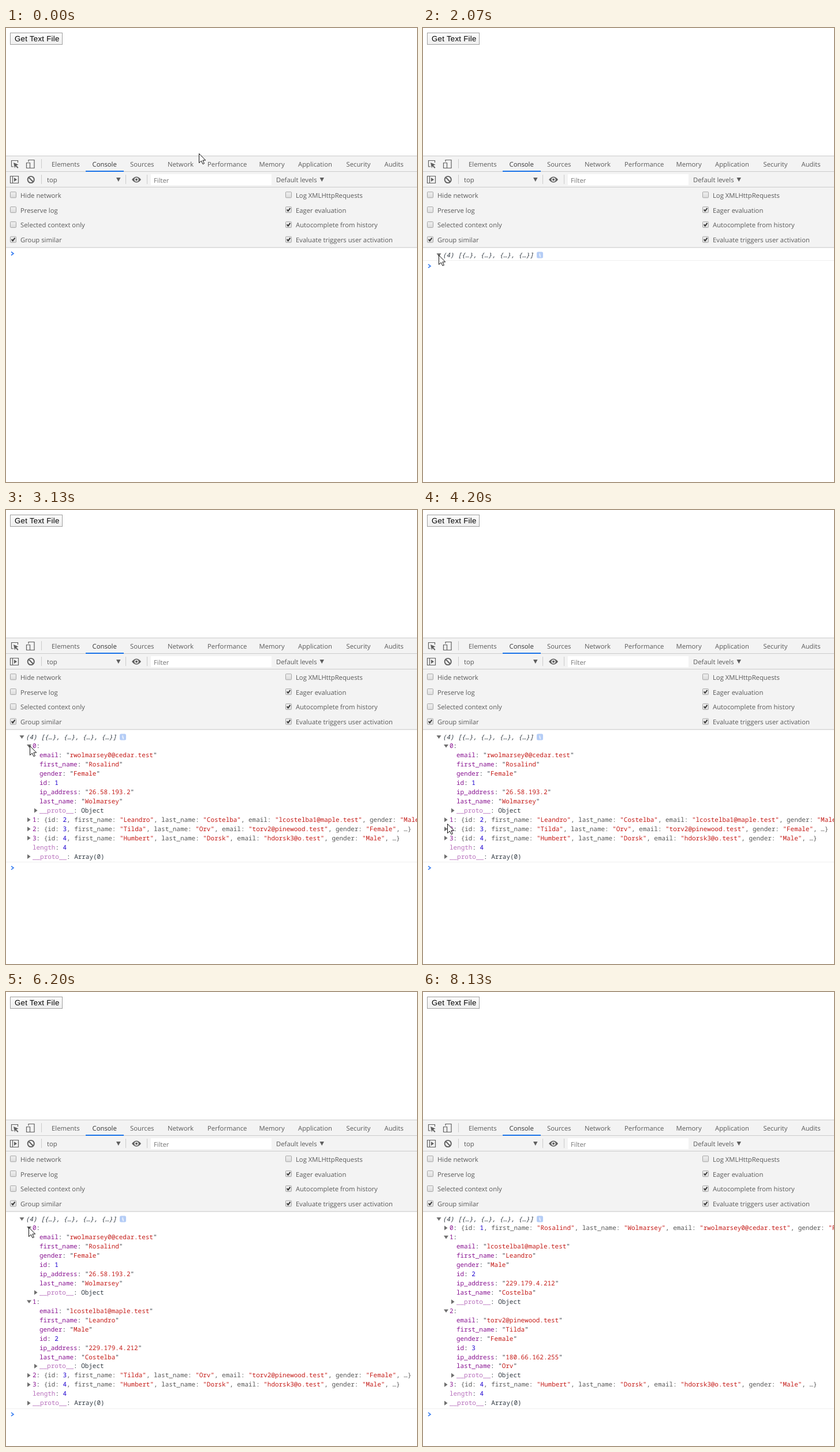
Animation, 712 px wide and 786 px high, one loop 8870 ms. Source, as an HTML page:

```html
<!DOCTYPE html>
<html lang="en">
<head>
<meta charset="utf-8">
<title>Console</title>
<style>
html, body { margin: 0; width: 100%; height: 100%; overflow: hidden; background: #fff; }
svg { display: block; width: 100%; height: 100%; }
text { white-space: pre; text-rendering: geometricPrecision; }
.ui { font: 11.3px "Open Sans", "Noto Sans", sans-serif; fill: #5a5a5a; }
.mono { font: 10.95px "Noto Sans Mono", "DejaVu Sans Mono", monospace; fill: #303942; }
.key { fill: #881391; }
.dim { fill: #b871bd; }
.str { fill: #c41a16; }
.num { fill: #1c00cf; }
.pre { fill: #565656; }
</style>
</head>
<body>
<svg viewBox="0 0 712 786">
  <defs>
    <linearGradient id="face" x2="0" y2="1"><stop stop-color="#fbfbfb"/><stop offset="1" stop-color="#efefef"/></linearGradient>
    <linearGradient id="box" x2="0" y2="1"><stop stop-color="#f0f0f0"/><stop offset="1" stop-color="#dcdcdc"/></linearGradient>
  </defs>
  <rect id="button" x="7.5" y="8.5" width="90" height="20" fill="url(#face)"/>
  <text x="15" y="23" font-family="Liberation Sans, Arial, sans-serif" font-size="13.2" letter-spacing=".3">Get Text File</text>
  <g id="panel"></g>
  <g id="output"></g>
  <path id="cursor" d="M.5.5V16.5L4.3 13L7 18.6L9.4 17.6L6.9 12H11.7Z" fill="#fff" stroke="#111" stroke-linejoin="round"/>
</svg>
<script>
const LOOP = 8870;
const ROW = 15.95;
const $ = id => document.getElementById(id);

const rect = (x, y, w, h, fill, extra = '') =>
  `<rect x="${x}" y="${y}" width="${w}" height="${h}" fill="${fill}" ${extra}/>`;
const label = (x, y, str, style = '') => `<text class="ui" x="${x}" y="${y}" style="${style}">${str}</text>`;
const path = (d, fill, extra = '') => `<path d="${d}" fill="${fill}" ${extra}/>`;
const line = (d, extra = '') => path(d, 'none', `stroke="#5f5f5f" stroke-width="1.2" ${extra}`);
const mono = (x, y, str, style = '') => `<text class="mono" x="${x}" y="${y}" style="${style}">${str}</text>`;
const span = (cls, str) => `<tspan class="${cls}">${str}</tspan>`;

function checkbox(x, y, str, checked) {
  return rect(x + .5, y - 5.5, 10, 10, 'url(#box)', 'rx="1" stroke="#a5a5a5"') +
    (checked ? path(`M${x + 2.7} ${y - .8}l2 2.5l3.8-5`, 'none', 'stroke="#333" stroke-width="1.9"') : '') +
    label(x + 18, y + 4.4, str);
}

function drawPanel() {
  const tabs = [[79, 'Elements'], [149.5, 'Console'], [215, 'Sources'], [280, 'Network'], [349, 'Performance'],
    [438.5, 'Memory'], [506, 'Application'], [589.5, 'Security'], [655.5, 'Audits']];
  const left = ['Hide network', 'Preserve log', 'Selected context only', 'Group similar'];
  const right = ['Log XMLHttpRequests', 'Eager evaluation', 'Autocomplete from history', 'Evaluate triggers user activation'];
  const icons =
    line('M13 240H9.5V229.5H20.5V233') + path('M13 233l8.5 3.5l-3.6 1.4l3.6 3.6l-1.4 1.4l-3.6-3.6l-1.4 3.4z', '#5f5f5f') +
    line('M39 231.5V228.5H49V242.5H42') + line('M35.5 233.5H41.5V242.5H35.5Z') +
    line('M7.5 256.5H21.5V268.5H7.5ZM11.5 256.5V268.5') + path('M14 259l5 3.5l-5 3.5z', '#5f5f5f') +
    line('M48.8 262.5a5.6 5.6 0 1 1-11.2 0a5.6 5.6 0 1 1 11.2 0M39.3 258.5L47.1 266.5', 'style="stroke-width:1.9"') +
    path('M218 262.5Q226 252.5 234 262.5Q226 272.5 218 262.5Z', '#5f5f5f') +
    '<circle cx="226" cy="262.5" r="3.6" fill="#f3f3f3"/><circle cx="226" cy="262.5" r="2" fill="#5f5f5f"/>';
  $('panel').innerHTML =
    rect(0, 221, 712, 160, '#f3f3f3') +
    [221, 248, 275, 379.5].map(y => rect(0, y, 712, 1, '#cbcbcb')).join('') +
    rect(138, 247, 66, 2, '#1a73e8') +
    [[61, 227], [61, 254], [207, 254], [244, 254]].map(([x, y]) => rect(x, y, 1, 16, '#cbcbcb')).join('') +
    tabs.map(([x, str]) => label(x, 240.3, str, str === 'Console' ? 'fill:#333' : '')).join('') +
    icons +
    label(71, 267, 'top') + path('M191 259h7.5l-3.75 7z', '#5f5f5f') +
    rect(251, 253, 209, 19, '#fff') + label(256, 267.6, 'Filter', 'fill:#757575') +
    label(468, 267, 'Default levels') + path('M543.5 259h7.5l-3.75 7z', '#5f5f5f') +
    left.map((str, i) => checkbox(7, 289.3 + i * 25.8, str, i === 3)).join('') +
    right.map((str, i) => checkbox(484, 289.3 + i * 25.8, str, i > 0)).join('');
}

const people = [
  { email: 'rwolmarsey0@cedar.test', first_name: 'Rosalind', gender: 'Female', id: 1, ip_address: '26.58.193.2', last_name: 'Wolmarsey' },
  { email: 'lcostelba1@maple.test', first_name: 'Leandro', gender: 'Male', id: 2, ip_address: '229.179.4.212', last_name: 'Costelba' },
  { email: 'torv2@pinewood.test', first_name: 'Tilda', gender: 'Female', id: 3, ip_address: '180.66.162.255', last_name: 'Orv' },
  { email: 'hdorsk3@o.test', first_name: 'Humbert', gender: 'Male', id: 4, ip_address: '', last_name: 'Dorsk' },
];
const previewKeys = ['id', 'first_name', 'last_name', 'email', 'gender'];

const value = v => typeof v === 'number' ? span('num', v) : `"${span('str', v)}"`;
const quoted = v => typeof v === 'number' ? span('num', v) : span('str', `"${v}"`);
const preview = p => span('pre', '{' + previewKeys.map(k => `${k}: ${quoted(p[k])}`).join(', ') + ', …}');

function arrow(x, y, open) {
  const d = open ? `M${x - 1} ${y - 2.7}h8l-4 5.6z` : `M${x} ${y - 4}l5.5 4l-5.5 4z`;
  return path(d, '#6e6e6e');
}

function listRows(open) {
  const rows = [];
  people.forEach((p, i) => {
    rows.push({ x: 46, str: span('key', i) + ': ' + (open[i] ? '' : preview(p)), arrow: open[i] ? 'down' : 'right' });
    if (!open[i]) return;
    for (const k in p) rows.push({ x: 58, str: `${span('key', k)}: ${value(p[k])}` });
    rows.push({ x: 58, str: span('dim', '__proto__') + ': Object', arrow: 'right' });
  });
  rows.push({ x: 46, str: `${span('dim', 'length')}: ${span('num', 4)}` });
  rows.push({ x: 46, str: span('dim', '__proto__') + ': Array(0)', arrow: 'right' });
  return rows;
}

function drawOutput({ logged, expanded, listed, open }) {
  let out = '', promptY = 390.5;
  if (logged) {
    const rows = listed ? listRows(open) : [];
    promptY = 412.2 + rows.length * ROW;
    out += arrow(expanded ? 24.5 : 26, 393, expanded) +
      mono(34, 396.7, '(4) [{…}, {…}, {…}, {…}]', expanded ? 'font-style:italic' : '');
    if (expanded) {
      out += rect(197, 387.5, 11, 11, '#b5cdf6', 'rx="2.5"') + path('M201.5 390.5h1.5M201 392.7h1.8v3.3h1.2', 'none', 'stroke="#fff" stroke-width="1.2"');
    }
    rows.forEach((r, i) => {
      const y = 408.6 + i * ROW;
      out += mono(r.x, y + 3.6, r.str);
      if (r.arrow) out += arrow(r.x - 9, y, r.arrow === 'down');
    });
    out += rect(0, Math.round(promptY - 10.2), 712, 1, '#f0f0f0');
  }
  out += path(`M9 ${promptY - 3}l4 3l-4 3`, 'none', 'stroke="#367cf1" stroke-width="1.6"');
  $('output').innerHTML = out;
}

// The screen refreshes 15 times a second.
const tick = ms => Math.floor(ms * .015 + .06);

// Pointer moves: first and last refresh in ms, then the points passed.
const moves = [
  [70, 130, [334, 217], [200, 42]],
  [400, 470, [68, 20], [54, 20]],
  [1000, 1870, [54, 20], [125, 130], [172, 310], [135, 440], [80, 472], [28, 396]],
  [1930, 1930, [28, 396], [27, 393]],
  [2270, 2730, [27, 393], [33, 407], [41, 413]],
  [2930, 3130, [41, 413], [41, 408]],
  [3330, 4200, [41, 408], [62, 450], [64, 500], [42, 543]],
  [4270, 4400, [42, 543], [39, 537]],
  [5470, 6200, [39, 537], [38, 470], [39, 407]],
  [6670, 7070, [39, 407], [38, 480], [40, 550]],
  [7730, 8070, [40, 550], [26, 650], [0, 758]],
];

function along(points, u) {
  const s = u * (points.length - 1);
  const i = Math.min(Math.floor(s), points.length - 2), f = s - i;
  const at = k => points[Math.max(0, Math.min(points.length - 1, k))];
  const [a, b, c, d] = [at(i - 1), at(i), at(i + 1), at(i + 2)];
  return [0, 1].map(n => Math.round(b[n] + f / 2 * (c[n] - a[n] +
    f * (2 * a[n] - 5 * b[n] + 4 * c[n] - d[n] + f * (3 * (b[n] - c[n]) + d[n] - a[n])))));
}

// Halfway between linear and smoothstep.
const ease = u => u * (1 + u * (3 - 2 * u)) / 2;

function pointer(now) {
  let move = moves[0];
  for (const m of moves) if (now >= tick(m[0])) move = m;
  const [start, end, ...points] = move;
  const first = tick(start) - 1;
  const u = Math.max(0, Math.min(1, (now - first) / (tick(end) - first)));
  return along(points, ease(u));
}

let shown = '';
function render(ms) {
  const now = tick(ms);
  const since = t => now >= tick(t);
  const state = {
    logged: since(730),
    expanded: since(2070),
    listed: since(2130),
    open: [since(3000) && !since(6470), since(4530), since(7470), false],
  };
  const key = JSON.stringify(state);
  if (key !== shown) drawOutput(state);
  shown = key;

  const hidden = since(200) && !since(400) || since(8130);
  $('cursor').setAttribute('visibility', hidden ? 'hidden' : 'visible');
  $('cursor').setAttribute('transform', `translate(${pointer(now)})`);
  $('button').setAttribute('stroke', since(400) && !since(1070) ? '#7f7f7f' : '#a0a0a0');
}

drawPanel();
const began = performance.now();
function frame() {
  render((performance.now() - began) % LOOP);
  requestAnimationFrame(frame);
}
frame();
</script>
</body>
</html>
```
